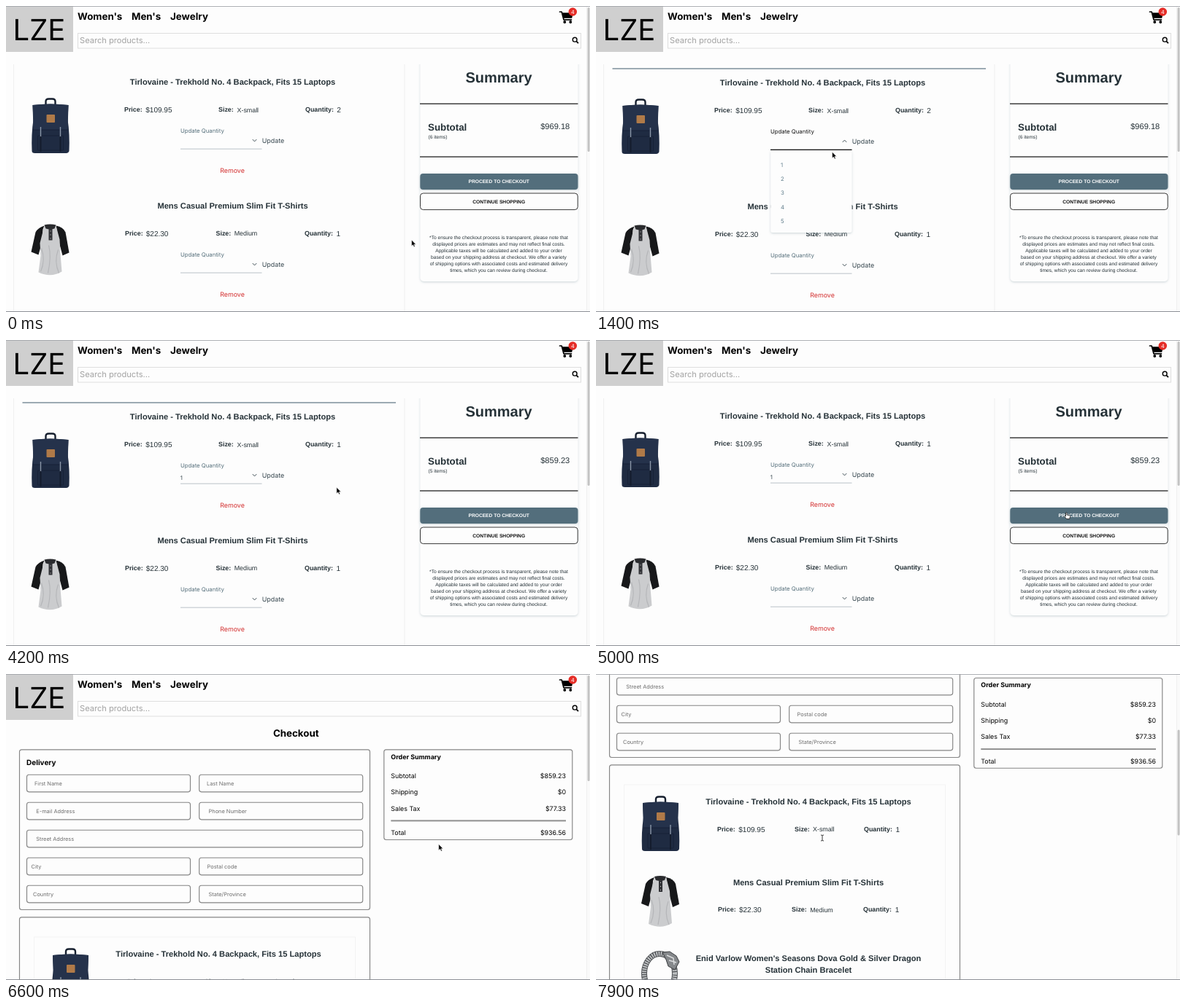
An HTML page for the animation above (8 s loop, 800 by 420 pixels).

```html
<!DOCTYPE html>
<html lang="en">
<head>
<meta charset="utf-8">
<title>Shop checkout</title>
<style>
html, body { margin: 0; width: 100%; height: 100%; overflow: hidden; background: #fdfdfd; }
svg { display: block; width: 100vw; height: 100vh; }
text { font-family: Inter, sans-serif; white-space: pre; text-rendering: geometricPrecision; }
.h { font-family: "Liberation Sans", Arial, sans-serif; }
.b { font-weight: 700; }
.m { text-anchor: middle; }
.e { text-anchor: end; }
</style>
</head>
<body>
<svg id="stage" viewBox="0 0 800 420" preserveAspectRatio="none"></svg>
<script>
const LOOP = 8000, STEP = 100;
const INK = '#263238', SLATE = '#546e7a', RED = '#d32f2f';
const BAG = 'Tirlovaine - Trekhold No. 4 Backpack, Fits 15 Laptops';
const SHIRT = 'Mens Casual Premium Slim Fit T-Shirts';

const text = (x, y, s, size, cls = '', fill = '#000', more = '') =>
  `<text x="${x}" y="${y}" font-size="${size}" class="${cls}" fill="${fill}" ${more}>${s}</text>`;
const rect = (x, y, w, h, fill, more = '') =>
  `<rect x="${x}" y="${y}" width="${w}" height="${h}" fill="${fill}" ${more}/>`;
const path = (d, fill, more = '') => `<path d="${d}" fill="${fill}" ${more}/>`;
const group = (id, body, more = '') => `<g id="${id}" ${more}>${body}</g>`;
const at = (x, y, body) => `<g transform="translate(${x} ${y})">${body}</g>`;
const frame = (x, y, w, h) => rect(x, y, w, h, 'none', 'rx="3" stroke="#858585" stroke-width="1.15"');

// product pictures, each about 53 wide
const bag =
  path('M20 10V5Q20 1.5 24 1.5H29Q33 1.5 33 5V10', 'none', 'stroke="#17202f" stroke-width="2.4"') +
  path('M2 10Q26 7 51 10L50 30Q53 50 52 73Q51 76 48 76H5Q1 76 1 73Q0 50 3 30Z', '#1f2b42') +
  path('M2 10Q26 7 51 10L50 44H3Z', '#25324b') +
  path('M3 44H50M9 52H44V72H9Z', 'none', 'stroke="#172136" stroke-width="1"') +
  path('M13 40V54M40 40V54', 'none', 'stroke="#8b97a8" stroke-width="1.4"') +
  path('M13 53V74M40 53V74', 'none', 'stroke="#141c2d" stroke-width="2"') +
  rect(21, 23, 11.5, 11, '#b07a48', 'rx="1"');

const shirt =
  path('M18 3Q9 6 6 12L0 39L10 43L15 25L16 8Z', '#17181a') +
  path('M34 3Q44 5 47 12L52 40L43 44L38 25Z', '#17181a') +
  path('M18 3Q26 7 34 3L39 22L40 42L42 66Q27 75 10 67L13 44L12 27Z', '#cbccce') +
  path('M14 34Q20 50 13 66M37 36Q31 52 38 68M24 30Q28 45 23 68', 'none', 'stroke="#b5b6b9" stroke-width="1.2"') +
  path('M18 2Q26 0 34 2L32 7Q26 9 20 7Z', '#2a2b2e') +
  path('M24 7H29V23H24Z', '#303135') +
  path('M26.5 10V21', 'none', 'stroke="#ddd" stroke-width="1" stroke-dasharray="1 4"');

const bracelet =
  '<ellipse cx="25" cy="32" rx="21" ry="27" fill="none" stroke="#55585b" stroke-width="8"/>' +
  '<ellipse cx="25" cy="32" rx="21" ry="27" fill="none" stroke="#c9cbcd" stroke-width="6" stroke-dasharray="1.6 1.5"/>' +
  path('M29 3L39 2L48 8L52 16L46 27L37 22L34 13Z', '#85888b', 'stroke="#3b3d40" stroke-width="1"') +
  path('M35 7L44 11L45 20M38 14L48 17', 'none', 'stroke="#dcdedf" stroke-width="1.4"');

const details = (y, price, size, xs, qty) =>
  text(xs[0], y, 'Price:', 8.89, 'h b', INK) + text(xs[1], y + 1, price, 10, 'h', INK) +
  text(xs[2], y, 'Size:', 8.89, 'h b', INK) + text(xs[3], y + .7, size, 8.89, 'h', INK) +
  text(xs[4], y, 'Quantity:', 8.89, 'h b', INK) + text(xs[5], y + 1, qty, 10, 'h', INK, 'data-qty="1"');

const title = (x, y, s) => text(x, y, s, 11.11, 'h b m', INK);

const cartItem = (n, y, name, picture, info) => at(0, y,
  picture + title(310.5, 108, name) + info +
  text(239, 174, 'Update Quantity', 7.78, '', SLATE, `id="label${n}"`) +
  rect(239, 195.7, 111.5, .9, '#b3bcc2', `id="under${n}"`) +
  path('M337.7 183L340.5 186L343.3 183', 'none', `id="chev${n}" stroke="#37474f" stroke-width=".9"`) +
  text(350.7, 188, 'Update', 8.89, '', '#37474f', `id="update${n}"`) +
  text(310, 229, 'Remove', 8.89, 'm', RED));

const header =
  rect(0, 0, 92, 63, '#cfcfcf') + text(45.5, 47, 'LZE', 40, 'm') +
  text(98, 19, "Women's", 13.33, 'b') + text(172, 19, "Men's", 13.33, 'b') + text(225, 19, 'Jewelry', 13.33, 'b') +
  rect(98.5, 37.5, 689, 20.5, '#fdfdfd', 'stroke="#dedede"') +
  text(101, 51.3, 'Search products...', 11.11, '', '#a3a3a3') +
  '<circle cx="779.2" cy="46.2" r="2.9" fill="none" stroke="#000" stroke-width="1.4"/>' +
  path('M781.3 48.4L784 51.2', 'none', 'stroke="#000" stroke-width="1.7"') +
  path('M758.5 8H761.2L764 18.8H774.5', 'none', 'stroke="#000" stroke-width="1.7" stroke-linejoin="round" stroke-linecap="round"') +
  path('M761.5 9.2H777L775.2 16.8H763.5Z', '#000') +
  '<circle cx="765.3" cy="22" r="1.9"/><circle cx="773.3" cy="22" r="1.9"/>' +
  '<circle cx="776.3" cy="8" r="5.8" fill="#e52d27"/>' + text(776.3, 10.8, '4', 7.4, 'm', '#fff');

const note = ['*To ensure the checkout process is transparent, please note that',
  'displayed prices are estimates and may not reflect final costs.',
  'Applicable taxes will be calculated and added to your order',
  'based on your shipping address at checkout. We offer a variety',
  'of shipping options with associated costs and estimated delivery',
  'times, which you can review during checkout.'];

const summary =
  rect(567.5, 60, 216, 318, '#fdfdfd', 'rx="5" filter="url(#soft)"') +
  text(675, 105, 'Summary', 20, 'h b m', INK) +
  rect(567, 133.6, 216.5, 1.2, '#111') + rect(567, 206.4, 216.5, 1.2, '#111') +
  text(578, 171, 'Subtotal', 13.33, 'h b', INK) +
  text(578.5, 182, '', 6.67, 'h', INK, 'id="count"') +
  text(772.3, 169.3, '', 11.11, 'h e', INK, 'id="sum"') +
  rect(567.3, 230, 216.2, 22, '#526e7b', 'rx="4" filter="url(#soft)"') +
  text(675.2, 243, 'PROCEED TO CHECKOUT', 6.67, 'h b m', '#fff') +
  rect(567.5, 257, 215.7, 22.6, '#fdfdfd', 'rx="4" stroke="#222" stroke-width=".9"') +
  text(675.2, 270.5, 'CONTINUE SHOPPING', 6.67, 'h b m', '#111') +
  note.map((s, i) => text(675, 320.4 + i * 8.95, s, 6.67, 'h m', INK)).join('');

const options = [1, 2, 3, 4, 5].map((n, i) => text(253, 220.7 + i * 19.3, n, 7.78, '', '#607d8b')).join('');

const cart =
  rect(10, 80, 1, 340, '#f0f0f0') + rect(545.5, 80, 1, 340, '#f0f0f0') +
  rect(22.5, 85.4, 511.5, 1.2, '#5d7484', 'id="divider"') +
  group('items',
    cartItem(1, 0, BAG, at(34.5, 126, bag), details(145, '$109.95', 'X-small', [162, 191.3, 291, 316.5, 410, 453.3], '2')) +
    text(238.8, 191, '1', 7.78, '', '#37474f', 'id="chosen"') +
    cartItem(2, 170, SHIRT, at(34.5, 128.5, shirt), details(144.5, '$22.30', 'Medium', [163, 191.8, 287.5, 312.7, 409, 452.5], '1'))) +
  summary +
  group('menu', rect(239.2, 198.5, 111.3, 112.5, '#fdfdfd', 'rx="3" filter="url(#soft)"') + options);

const field = (x, y, w, tx, s) => frame(x, y - 11.8, w, 23.6) + text(tx, y + 2.7, s, 7.4, '', '#6d6d6d');
const fields = [
  [28.5, 150, 224, 39, 'First Name'], [264.7, 150, 224, 275, 'Last Name'],
  [28.5, 188, 224, 41.3, 'E-mail Address'], [264.7, 188, 224, 277.6, 'Phone Number'],
  [28.5, 226, 460.2, 41.3, 'Street Address'],
  [28.5, 264, 224, 34.5, 'City'], [264.7, 264, 224, 275.6, 'Postal code'],
  [28.5, 302, 224, 37, 'Country'], [264.7, 302, 224, 277.6, 'State/Province']];

const row = (y, s, v) => text(527.3, y, s, 8.89) + text(767, y, v, 8.89, 'e');

const checkout =
  text(397.3, 85.6, 'Checkout', 13.33, 'b m') +
  frame(18.5, 103.8, 480, 219.7) + text(28, 124.6, 'Delivery', 10, 'b') +
  fields.map(f => field(...f)).join('') +
  frame(18.5, 333.8, 480, 700) + rect(38.5, 361, 440, 640, 'none', 'stroke="#f3f3f3"') +
  group('smallBag', bag) +
  title(291, 388, BAG) + details(424.7, '$109.95', 'X-small', [166, 195.3, 272, 297, 367, 410.4], '1') +
  at(62, 485, shirt) + title(291, 498.6, SHIRT) +
  details(535, '$22.30', 'Medium', [167, 196, 268, 293.2, 366, 409.8], '1') +
  at(62, 588, bracelet) +
  title(291, 603, "Enid Varlow Women's Seasons Dova Gold &amp; Silver Dragon") +
  title(291, 618.8, 'Station Chain Bracelet');

const order =
  frame(517.8, 103.8, 258, 123.7) + text(527.3, 116.6, 'Order Summary', 8.89, 'b') +
  row(143.2, 'Subtotal', '$859.23') + row(165.3, 'Shipping', '$0') + row(187.7, 'Sales Tax', '$77.33') +
  rect(527.3, 200.4, 239.7, 2, '#8f8f8f') + row(221.2, 'Total', '$936.56');

const cursors =
  group('arrow', path('M0 0V8.6L2 6.8L3.4 9.8L4.8 9.1L3.5 6.3H6.1Z', '#000', 'stroke="#fff" stroke-width=".6"')) +
  group('hand', path('M2 6V1.2Q2.8 .2 3.6 1.2V4L7.4 4.8Q8.2 5.2 8 6.4L7.2 9.6H3.2L.2 6.2Q.6 5 2 6Z', '#fff', 'stroke="#111" stroke-width=".8"')) +
  group('beam', path('M-2 -4Q0 -4 0 -3Q0 -4 2 -4M0 -3V3M-2 4Q0 4 0 3Q0 4 2 4', 'none', 'stroke="#222" stroke-width=".9"'));

const stage = document.getElementById('stage');
stage.innerHTML =
  `<defs><filter id="soft" x="-10%" y="-20%" width="120%" height="150%">
  <feDropShadow dx="0" dy="1.2" stdDeviation="1.6" flood-color="#607d8b" flood-opacity=".3"/></filter>
  <clipPath id="below"><rect y="80" width="800" height="340"/></clipPath></defs>` +
  rect(0, 0, 800, 420, '#fdfdfd') +
  group('cart', cart, 'clip-path="url(#below)"') +
  group('page', group('checkout', checkout) + header) + group('order', order) +
  rect(795, 0, 5, 420, '#fafafa') + rect(795, 0, .6, 420, '#e9e9e9') +
  rect(796.6, 2, 3, 198, '#c2c2c2', 'id="thumb" rx="1.5"') +
  rect(0, 0, 800, .9, '#a5a8ad') + rect(0, 419, 800, 1, '#8d9096') +
  group('status', rect(0, 410, 83.5, 10, '#2b3733', 'rx="1"') + text(2.3, 417.6, 'localhost:3000/checkout', 6.7, '', '#f2f2f2')) +
  group('cursor', cursors);

const $ = id => document.getElementById(id);
const show = (id, on) => { $(id).style.display = on ? '' : 'none'; };
const set = (id, attrs) => { for (const k in attrs) $(id).setAttribute(k, attrs[k]); };
const qty = $('items').querySelector('[data-qty]');

// time, x, y
const track = [[0, 555.5, 321], [100, 555.5, 321], [700, 343, 187], [1000, 343, 187], [1400, 323.5, 200.3],
  [1800, 257, 216], [2200, 257, 216], [2700, 365.5, 186.5], [3900, 365.5, 186.5], [4700, 641.5, 236],
  [5300, 641.5, 236], [5400, 645, 235], [6400, 645, 235], [7200, 310, 225], [LOOP, 310, 225]];

function pointer(t) {
  const i = track.findIndex(k => k[0] > t);
  const [t0, x0, y0] = track[i - 1], [t1, x1, y1] = track[i];
  const u = (t - t0) / (t1 - t0), s = u * u * (3 - 2 * u);
  return [x0 + (x1 - x0) * s, y0 + (y1 - y0) * s];
}

function draw(t) {
  const within = (a, b) => t >= a && t < b;
  const paid = t >= 5400, open = within(1000, 2100), updated = t >= 3800;
  const nudged = within(400, 4600), shift = nudged ? 1 : 0;

  show('cart', !paid);
  show('checkout', paid);
  show('order', paid);
  show('divider', nudged);
  set('items', { transform: `translate(0 ${shift})` });
  show('menu', open);
  $('menu').style.opacity = Math.min(1, (t - 900) / 200);
  set('label1', { fill: open ? '#111' : SLATE });
  set('under1', { fill: open ? '#111' : '#b3bcc2', height: open ? 1.3 : .9 });
  set('chev1', { transform: open ? 'rotate(180 340.5 184.5)' : '' });
  set('update1', { 'text-decoration': within(2700, 4000) ? 'underline' : 'none' });
  show('chosen', t >= 2100);
  qty.textContent = updated ? '1' : '2';
  $('count').textContent = updated ? '(5 items)' : '(6 items)';
  $('sum').textContent = updated ? '$859.23' : '$969.18';

  const scroll = 209 * Math.max(0, (t - 7700) / 200) ** 1.3;
  set('page', { transform: `translate(0 ${-scroll})` });
  set('order', { transform: `translate(0 ${-Math.min(scroll, 98.3)})` });
  set('smallBag', { transform: t < 6500 ? 'translate(62 382.5) scale(1 .52)' : 'translate(62 376)' });
  const length = !paid ? 198 : t < 6000 ? 155 : 145;
  set('thumb', { y: 2 + scroll * .357, height: length });
  show('status', within(5100, 6000));

  const [x, y] = pointer(t);
  const hand = within(1800, 2300) || within(2700, 4000) || within(4500, 5400);
  const beam = t >= 6900;
  show('hand', hand);
  show('beam', beam);
  show('arrow', !hand && !beam);
  set('cursor', { transform: `translate(${x} ${y})` });
}

function tick(now) {
  draw(Math.floor((now % LOOP) / STEP) * STEP);
  requestAnimationFrame(tick);
}
draw(0);
requestAnimationFrame(tick);
</script>
</body>
</html>
```
